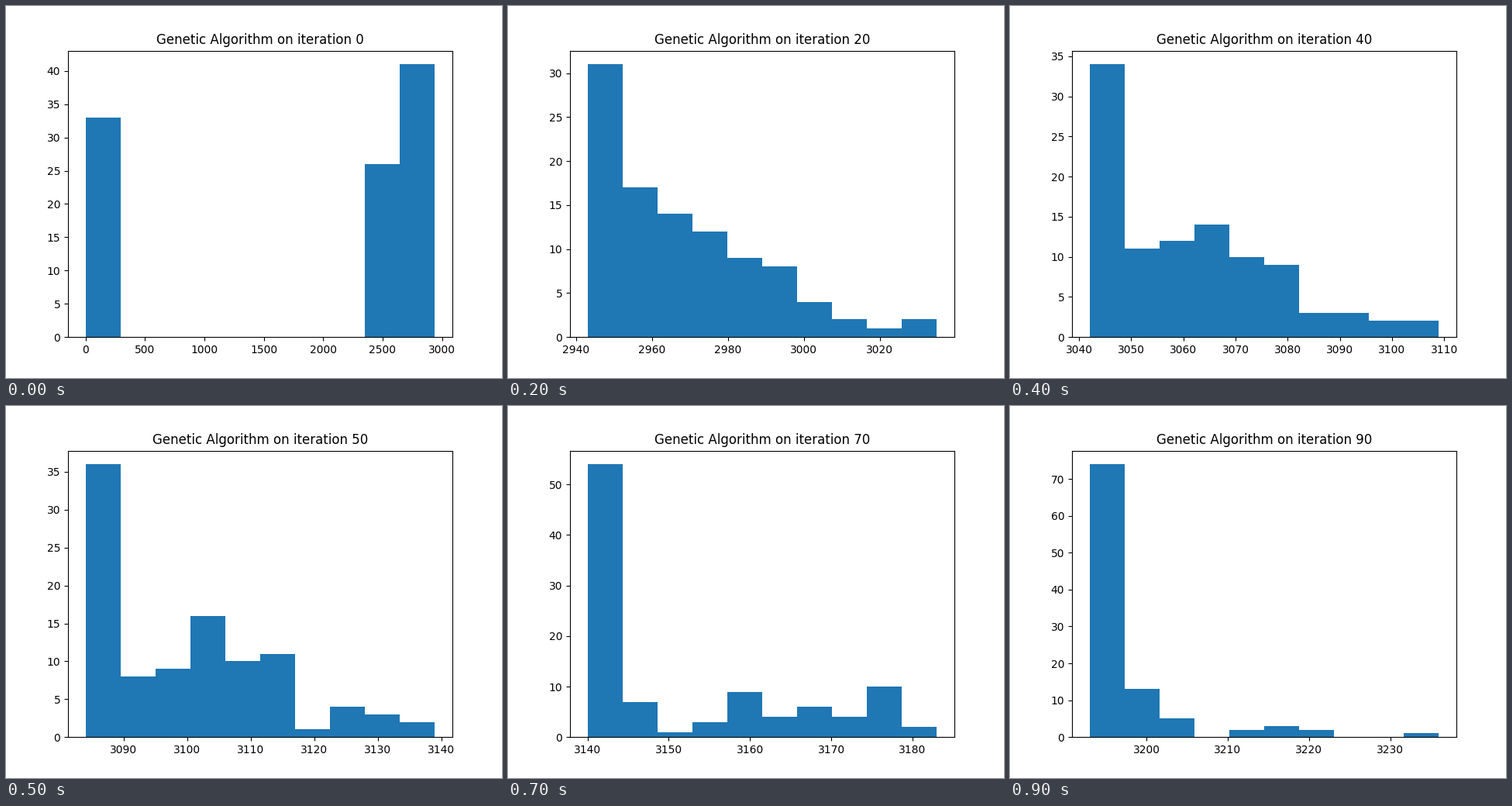
Write a matplotlib script that moves like this. It is 640 px wide and 480 px high and loops after 1.91 s.

```python
import matplotlib.pyplot as plt
import numpy as np
from matplotlib.animation import FuncAnimation

TICK = 10      # ms per animation frame
LOOP = 1910    # ms, the last histogram is held longer
STEP = 100     # ms per histogram

# (lowest fitness, highest fitness, counts in ten equal bins)
GENERATIONS = [
    (0, 2941, [33, 0, 0, 0, 0, 0, 0, 0, 26, 41]),
    (2863, 2991, [20, 18, 19, 11, 7, 10, 11, 1, 0, 3]),
    (2943, 3035, [31, 17, 14, 12, 9, 8, 4, 2, 1, 2]),
    (2991, 3085, [32, 13, 14, 13, 10, 9, 1, 2, 3, 3]),
    (3042, 3109, [34, 11, 12, 14, 10, 9, 3, 3, 2, 2]),
    (3084, 3139, [36, 8, 9, 16, 10, 11, 1, 4, 3, 2]),
    (3113, 3160, [42, 9, 6, 10, 10, 8, 4, 4, 5, 2]),
    (3140, 3183, [54, 7, 1, 3, 9, 4, 6, 4, 10, 2]),
    (3176, 3215, [28, 17, 25, 6, 19, 2, 0, 0, 0, 3]),
    (3193, 3236, [74, 13, 5, 0, 2, 3, 2, 0, 0, 1]),
]

fig = plt.figure(figsize=(6.4, 4.8), dpi=100)


def histogram(index, low, high, counts):
    ax = fig.add_subplot(visible=False)
    edges = np.linspace(low, high, len(counts) + 1)
    ax.hist(edges[:-1], bins=edges, weights=counts)
    ax.set_title(f"Genetic Algorithm on iteration {10 * index}")
    return ax


plots = [histogram(i, *gen) for i, gen in enumerate(GENERATIONS)]


def update(frame):
    current = min(frame * TICK // STEP, len(plots) - 1)
    for i, ax in enumerate(plots):
        ax.set_visible(i == current)
    return plots


anim = FuncAnimation(fig, update, frames=LOOP // TICK, interval=TICK,
                     repeat=True, repeat_delay=0)
plt.show()
```
